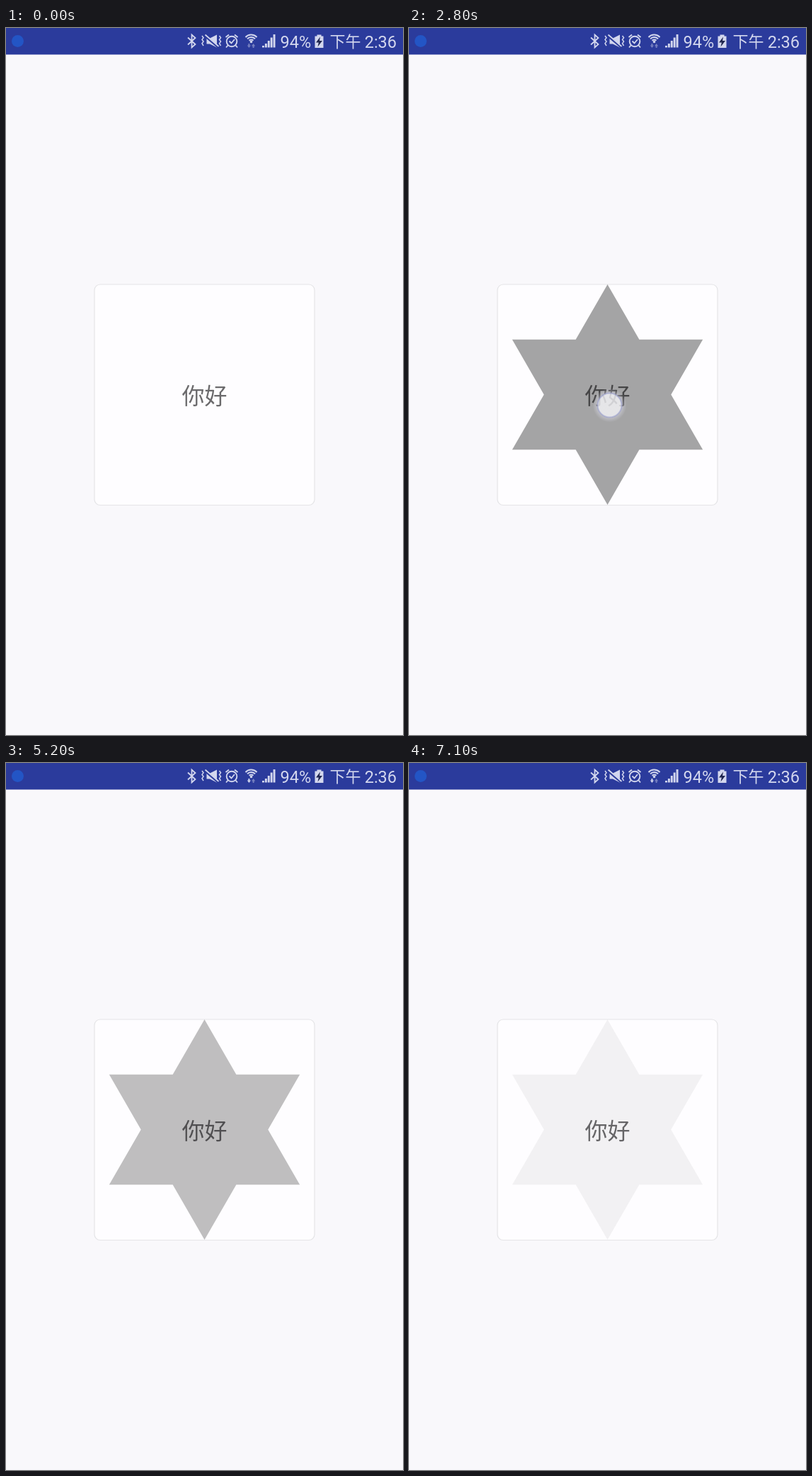
These frames come from a looping animation (561 by 998 pixels, 8.7 s). An HTML page with a canvas:

```html
<!DOCTYPE html>
<html lang="zh">
<head>
<meta charset="utf-8">
<title>Star ripple</title>
<style>
html, body { margin: 0; width: 100%; height: 100%; overflow: hidden; background: #f9f8fb; }
canvas { display: block; width: 561px; height: 998px; }
</style>
</head>
<body>
<canvas id="stage" width="561" height="998"></canvas>
<script>
const ctx = document.getElementById('stage').getContext('2d');
const LOOP = 8700, STEP = 100;
const CX = 280.5, CY = 517.5, STAR_R = 155.5;
const RIPPLE_R = 220, GROW = 1356, FADE = 600;
const INK = '#d3d7ee', BAR = '#2b3b9c';
const CJK = '"Noto Sans CJK SC", "Noto Sans CJK", sans-serif';

// Star tint: [time, alpha]
const TINT = [
  [0, 0], [1650, 0], [2200, .228], [2880, .228], [3300, .068], [3750, .228],
  [5000, .228], [5600, .012], [6300, .012], [6500, .12], [6700, .031],
  [6900, .13], [7100, .047], [LOOP, .047]
];

const PRESSES = [
  { x: 283.5, y: 532.5, down: 1600, wave: 1770, up: 2880 },
  { x: 291, y: 526.5, down: 3300, wave: 3300, up: 5000 },
  { x: 320.5, y: 501, down: 6300, up: 6500 },
  { x: 320.5, y: 501, down: 6700, up: 6900 }
];

const star = new Path2D();
for (let i = 0; i < 12; i++) {
  const r = i % 2 ? STAR_R / Math.sqrt(3) : STAR_R, a = i * Math.PI / 6;
  star.lineTo(CX + r * Math.sin(a), CY - r * Math.cos(a));
}
star.closePath();

const clamp = v => Math.max(0, Math.min(1, v));

function sample(track, t) {
  const i = Math.max(1, track.findIndex(k => k[0] > t));
  const [t0, a] = track[i - 1], [t1, b] = track[i];
  return a + (b - a) * (t - t0) / (t1 - t0);
}

function stroke(d, width, color = INK) {
  ctx.lineWidth = width;
  ctx.strokeStyle = color;
  ctx.stroke(new Path2D(d));
}

function fill(d, color = INK) {
  ctx.fillStyle = color;
  ctx.fill(new Path2D(d));
}

function arc(x, y, r, from = 0, to = Math.PI * 2) {
  ctx.beginPath();
  ctx.arc(x, y, r, from, to);
}

function text(str, x, y, font, color, align = 'left') {
  ctx.font = font;
  ctx.fillStyle = color;
  ctx.textAlign = align;
  ctx.fillText(str, x, y);
}

function drawStatus(t) {
  ctx.fillStyle = BAR;
  ctx.fillRect(0, 0, 561, 37.5);

  arc(16.5, 18.5, 8.5);
  ctx.fillStyle = '#2355c5';
  ctx.fill();

  // Bluetooth
  stroke('M257 13.5 L267.5 23 L262.5 27.5 V9.5 L267.5 14 L257 23.5', 1.8);

  // Muted speaker between two vibration marks
  fill('M283.5 14.5 H288 L298 9.5 V27.5 L288 22.5 H283.5 Z');
  stroke('M280 10 L300 27', 3.4, BAR);
  stroke('M281.5 9.5 L300.5 26', 1.7);
  stroke('M277 11 l2 2.7 l-2 2.7 l2 2.7 l-2 2.7 l2 3.2 M301.5 11 l2 2.7 l-2 2.7 l2 2.7 l-2 2.7 l2 3.2', 1.5);

  // Alarm
  arc(319, 19, 7.3);
  ctx.lineWidth = 1.9;
  ctx.stroke();
  stroke('M310.5 13 L315 9.5 M327.5 13 L323 9.5 M313.5 24.5 L311 27.5 M324.5 24.5 L327 27.5 M315.5 18.5 L318.5 21.5 L323 16', 1.8);

  // Wi-Fi and its traffic arrows
  for (const r of [4, 7.5, 11]) {
    arc(346.5, 20.5, r, -Math.PI * .76, -Math.PI * .24);
    ctx.lineWidth = 2;
    ctx.stroke();
  }
  arc(346.5, 19.5, 1.8);
  ctx.fillStyle = INK;
  ctx.fill();
  const dim = '#7680c0';
  fill('M342.4 22 h2 v2.5 h1.6 l-2.6 3.5 l-2.6 -3.5 h1.6 Z', t >= 4500 ? INK : dim);
  fill('M348.6 28 h2 v-2.5 h1.6 l-2.6 -3.5 l-2.6 3.5 h1.6 Z', dim);

  // Signal
  ctx.fillStyle = INK;
  for (let i = 0; i < 5; i++) {
    const h = [2.5, 5.5, 9.5, 14, 18.5][i];
    ctx.fillRect(362 + i * 3.9, 27.5 - h, 2.9, h);
  }

  // Battery
  fill('M439.5 9.5 h6 v2 h3 v16.5 h-12 v-16.5 h3 Z');
  fill('M444 12.5 L438 20.5 H441.8 L440.5 26.5 L447 18 H443 Z', '#20264f');

  const font = '23.5px Roboto, sans-serif';
  text('94%', 387.5, 27.5, font, INK);
  text('下午', 457.5, 27.3, '22px ' + CJK, INK);
  text('2:36', 552, 27.5, font, INK, 'right');
}

function drawCard() {
  ctx.beginPath();
  ctx.roundRect(125, 362, 311, 311.5, 8);
  ctx.fillStyle = '#fefdff';
  ctx.fill();
  ctx.lineWidth = 1.2;
  ctx.strokeStyle = '#e5e5e7';
  ctx.stroke();
  text('你好', CX, 531, '32px ' + CJK, '#6b6a6c', 'center');
}

function drawRipple(t) {
  ctx.fillStyle = `rgba(0,0,0,${sample(TINT, t)})`;
  ctx.fill(star);
  ctx.save();
  ctx.clip(star);
  for (const p of PRESSES) {
    if (!p.wave || t <= p.wave || t >= p.up + FADE) continue;
    const grown = clamp((t - p.wave) / GROW);
    const drift = clamp(grown * 1.16);
    const alpha = .163 * (1 - clamp((t - p.up) / FADE));
    arc(p.x + (CX - p.x) * drift, p.y + (CY - p.y) * drift, RIPPLE_R * grown);
    ctx.fillStyle = `rgba(0,0,0,${alpha})`;
    ctx.fill();
  }
  ctx.restore();
}

function drawTouch({ x, y }) {
  const glow = ctx.createRadialGradient(x, y, 17, x, y, 24);
  glow.addColorStop(0, 'rgba(225,225,240,.45)');
  glow.addColorStop(1, 'rgba(225,225,240,0)');
  arc(x, y, 24);
  ctx.fillStyle = glow;
  ctx.fill();
  arc(x, y, 17);
  ctx.fillStyle = 'rgba(255,255,255,.6)';
  ctx.fill();
  ctx.lineWidth = 2;
  ctx.strokeStyle = 'rgba(150,156,205,.55)';
  ctx.stroke();
}

function draw(now) {
  const t = Math.floor(now % LOOP / STEP) * STEP;
  ctx.fillStyle = '#f9f8fb';
  ctx.fillRect(0, 0, 561, 998);
  drawStatus(t);
  drawCard();
  drawRipple(t);
  PRESSES.filter(p => t >= p.down && t < p.up).forEach(drawTouch);
}

const start = performance.now();
function tick() {
  draw(performance.now() - start);
  requestAnimationFrame(tick);
}
tick();
</script>
</body>
</html>
```
